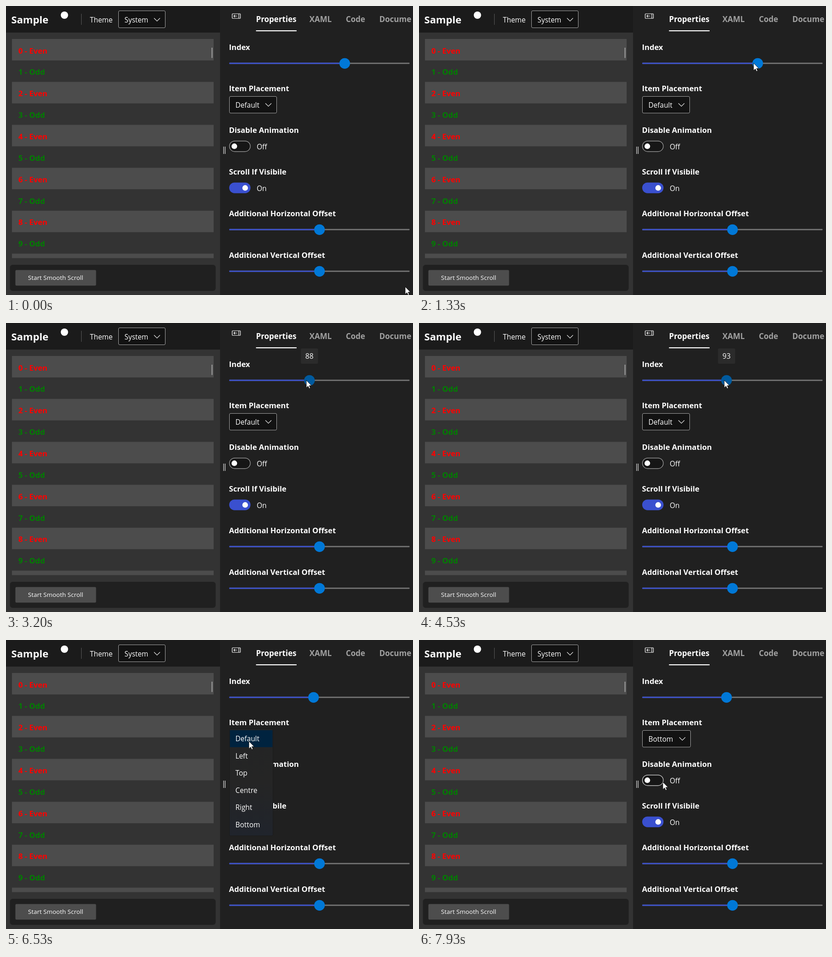
Recreate the animation shown at these times as an HTML page. Size 888 by 631 pixels, loop 8000 ms.

```html
<!DOCTYPE html>
<html lang="en">
<head>
<meta charset="utf-8">
<title>Smooth scroll sample</title>
<style>
html, body { margin: 0; width: 100%; height: 100%; overflow: hidden; background: #202020; }
svg { display: block; width: 888px; height: 631px; font-family: "Open Sans", "Noto Sans", sans-serif; fill: #fff; }
.b { font-weight: 700; }
</style>
</head>
<body>
<svg id="stage" viewBox="0 0 888 631" xmlns="http://www.w3.org/2000/svg"></svg>
<script>
const LOOP = 8000, STEP = 1000 / 15;
const BLUE = '#3a50cf', GRAY = '#767676', LINE = '#a6a6a6', LINE_HOT = '#dcdcdc', MUTED = '#a0a0a0';
const stage = document.getElementById('stage');

function el(name, attrs, parent = stage, str) {
  const node = document.createElementNS('http://www.w3.org/2000/svg', name);
  set(node, attrs);
  if (str !== undefined) node.textContent = str;
  parent.appendChild(node);
  return node;
}
function set(node, attrs) {
  for (const key in attrs) node.setAttribute(key, attrs[key]);
}
const group = () => el('g', {});
const rect = (x, y, width, height, fill, more, parent) =>
  el('rect', { x, y, width, height, fill, ...more }, parent);
const circle = (cx, cy, r, fill = '#fff') => el('circle', { cx, cy, r, fill });
const path = (d, stroke, width, parent) =>
  el('path', { d, stroke, 'stroke-width': width, fill: 'none' }, parent);
const text = (x, y, size, str, more, parent) =>
  el('text', { x, y, 'font-size': size, ...more }, parent, str);
const bold = (x, y, size, str, fill = '#fff', more) => text(x, y, size, str, { class: 'b', fill, ...more });
const chevron = (x, y, parent) => path(`M${x} ${y}l6.5 6.5l6.5 -6.5`, '#e4e4e4', 1.2, parent);
const show = (node, on) => set(node, { visibility: on ? 'visible' : 'hidden' });

const defs = el('defs', {});
function gradient(id, dir, ...colors) {
  const g = el('linearGradient', { id, x2: 0, ...dir }, defs);
  colors.forEach((c, i) => el('stop', { offset: i / (colors.length - 1), 'stop-color': c }, g));
}
gradient('menuFill', { y2: 1 }, '#232425', '#252525', '#20242c');
gradient('hoverFill', { x2: 1 }, '#444', '#505050', '#404040');
const clip = (id, ...box) => rect(...box, '#fff', {}, el('clipPath', { id }, defs));
clip('tabClip', 800, 0, 84, 60);
const menuMask = clip('menuClip', 487, 193, 96, 235);

// Left side
rect(0, 0, 467, 631, '#333');
rect(0, 0, 467, 58, '#1b1b1b');
bold(11.5, 37.5, 22.1, 'Sample');
circle(127.5, 20, 8);
rect(164, 17, 1, 24, '#5a5a5a');
text(183, 36, 15.4, 'Theme');
rect(245.5, 10.5, 102, 37, '#121212', { rx: 2.5, stroke: LINE });
text(258.5, 35.5, 15.4, 'System');
chevron(323, 26.5);

const ROW = 46.87;
for (let i = 0; i <= 10; i++) {
  const y = 72 + ROW * i, even = i % 2 === 0;
  if (even) rect(13, y, 440, Math.min(ROW, 550.5 - y), '#4c4c4c');
  if (i < 10) bold(27, y + 31.5, 16.7, `${i} - ${even ? 'Even' : 'Odd'}`, even ? '#f00' : '#008000');
}
rect(448.5, 91, 2, 22.5, MUTED);
rect(8.5, 565, 449, 57, '#202020', { rx: 6 });
rect(20.5, 576.5, 176, 34, '#4d4d4d', { rx: 2.5 });
text(48, 598, 13.5, 'Start Smooth Scroll');

// Right side
for (const x of [474, 477.5]) rect(x, 307, 1.5, 16, '#bdbdbd');
rect(493.5, 17, 18, 10, 'none', { rx: 1, stroke: '#fff', 'stroke-width': 1.2 });
path('M508 17V27M504.5 22H497M499.5 19.5L497 22L499.5 24.5', '#fff', 1.2);

const tab = (x, name, fill = MUTED) => bold(x, 34.5, 17, name, fill, { 'clip-path': x > 800 ? 'url(#tabClip)' : 'none' });
tab(545.5, 'Properties', '#fff');
tab(662, 'XAML');
tab(741.5, 'Code');
tab(814.5, 'Documents');
rect(545.5, 53, 88.5, 2.2, '#fff');

['Index', 'Item Placement', 'Disable Animation', 'Scroll If Visibile',
 'Additional Horizontal Offset', 'Additional Vertical Offset']
  .forEach((label, i) => bold(486.5, 95.5 + 90.8 * i, 16.6, label));

function slider(y) {
  const track = (width, fill) => rect(487, y - 1.5, width, 2.7, fill, { rx: 1 });
  return { rest: track(393.5, GRAY), done: track(197, BLUE), thumb: circle(684, y, 11.6, '#0078d7') };
}
const index = slider(125.3);
slider(488.3);
slider(579.3);

const combo = group();
const comboBox = rect(487.5, 197.5, 103, 36.3, '#121212', { rx: 2.5 }, combo);
const comboText = text(500.5, 222, 15.4, '', {}, combo);
const comboArrow = chevron(566, 212.5, combo);

const offBox = rect(487.5, 294.8, 45.5, 23, '#161616', { rx: 11.5, 'stroke-width': 1.2 });
circle(498.2, 306.2, 6.1);
text(547, 312.5, 15.5, 'Off');
rect(487, 385.4, 46.5, 23.3, BLUE, { rx: 11.6 });
circle(521.8, 397.2, 6.1);
text(547, 403.5, 15.5, 'On');

// Value bubble
const tip = group();
const tipBox = rect(0, 55.5, 47, 33.5, '#2b2b2b', { rx: 3 }, tip);
const tipText = text(0, 77.5, 15.7, '', { 'text-anchor': 'middle' }, tip);

// Drop-down list
const ITEM = 37.5, ITEM_TOP = 197;
const menu = group();
set(menu, { 'clip-path': 'url(#menuClip)' });
rect(487.5, 193.5, 95, 234, 'url(#menuFill)', { rx: 2, stroke: '#1a1a1a' }, menu);
rect(488.5, ITEM_TOP, 93, 37, '#00233f', {}, menu);
const hoverBar = rect(488.5, 0, 93, 36.5, 'url(#hoverFill)', {}, menu);
['Default', 'Left', 'Top', 'Centre', 'Right', 'Bottom'].forEach((name, i) =>
  text(500.5, 221 + ITEM * i, 15.4, name, {}, menu));

const cursor = el('path', {
  d: 'M0 0V16.4L3.8 12.8L6.3 18.2L8.8 17.1L6.4 11.8H11.4Z',
  stroke: '#000', 'stroke-width': 0.8
});

// Pointer gestures: start, end, destination, easing
const out = p => 1 - (1 - p) ** 2;
const smooth = p => p * p * (3 - 2 * p);
const moves = [
  [0, 870, 643, 201, out],
  [870, 1400, 734, 121, smooth],
  [1567, 2400, 679, 121, smooth],
  [2900, 3230, 655, 125, out],
  [3430, 3600, 662, 125, smooth],
  [4400, 4467, 666, 125, smooth],
  [5400, 5667, 502, 294, smooth],
  [5667, 5830, 497, 333, out],
  [5830, 6200, 530, 221, smooth],
  [6600, 7200, 521, 402, out],
  [7667, 7933, 532, 310, out]
];
function pointer(t) {
  let x = 871, y = 613;
  for (const [start, end, toX, toY, ease] of moves) {
    if (t <= start) break;
    const p = ease(Math.min(1, (t - start) / (end - start)));
    x += (toX - x) * p;
    y += (toY - y) * p;
  }
  return { x, y };
}
const between = (t, a, b) => t >= a && t < b;
const inside = ({ x, y }, left, top, right, bottom) => between(x, left, right) && between(y, top, bottom);

const PRESS = 1660, RELEASE = 5195, OPEN = 6395, PICK = 7465, CLOSED = 7525;

function drawSlider(t) {
  // While held, the thumb trails the pointer by one step
  const x = t < PRESS ? 739 : pointer(Math.min(t, RELEASE) - STEP).x + 5;
  const pressed = between(t, PRESS, RELEASE), hover = between(t, 1390, PRESS);
  const value = String(Math.round((x - 498.5) / 370 * 199));
  const width = 19.5 + 9.1 * value.length;
  set(index.done, { width: x - 487 });
  set(index.rest, { fill: hover ? '#8c8c8c' : GRAY });
  set(index.thumb, { cx: x, fill: pressed ? '#005a9e' : hover ? '#1a86dc' : '#0078d7' });
  set(tipBox, { x: x - width / 2, width });
  set(tipText, { x });
  tipText.textContent = value;
  set(tip, { opacity: t < PRESS ? 0 : Math.max(0, Math.min(1, 1 - (t - RELEASE + 50) / 180)) });
}

function drawMenu(t, at) {
  const open = between(t, OPEN, CLOSED), picked = t >= PICK;
  const row = Math.floor((at.y - ITEM_TOP) / ITEM);
  show(menu, open);
  set(menu, { opacity: picked ? 0.4 : 1 });
  set(menuMask, { height: 235 * Math.min(1, 0.45 + (t - OPEN) / 240) * open });
  show(hoverBar, open && row > 0);
  set(hoverBar, { y: ITEM_TOP + ITEM * row + 0.8 });

  // The highlight fades a little after the pointer has left
  const hot = !open && inside(pointer(t - 2 * STEP), 487, 197, 591, 235);
  show(combo, !open || picked);
  set(comboBox, { width: picked ? 105 : 103, fill: hot ? '#0c0c0c' : '#121212', stroke: hot ? LINE_HOT : LINE });
  set(comboArrow, { transform: `translate(${picked ? 2 : 0} 0)` });
  comboText.textContent = picked ? 'Bottom' : 'Default';

  show(offBox, true);
  set(offBox, { stroke: !open && inside(at, 487, 294, 534, 319) ? LINE_HOT : LINE });
}

function draw(t) {
  const at = pointer(t);
  drawSlider(t);
  drawMenu(t, at);
  set(cursor, { transform: `translate(${at.x.toFixed(1)} ${at.y.toFixed(1)})` });
}

function tick(now) {
  draw(Math.floor((now % LOOP + 3.5) / STEP) * STEP % LOOP);
  requestAnimationFrame(tick);
}
draw(0);
requestAnimationFrame(tick);
</script>
</body>
</html>
```
